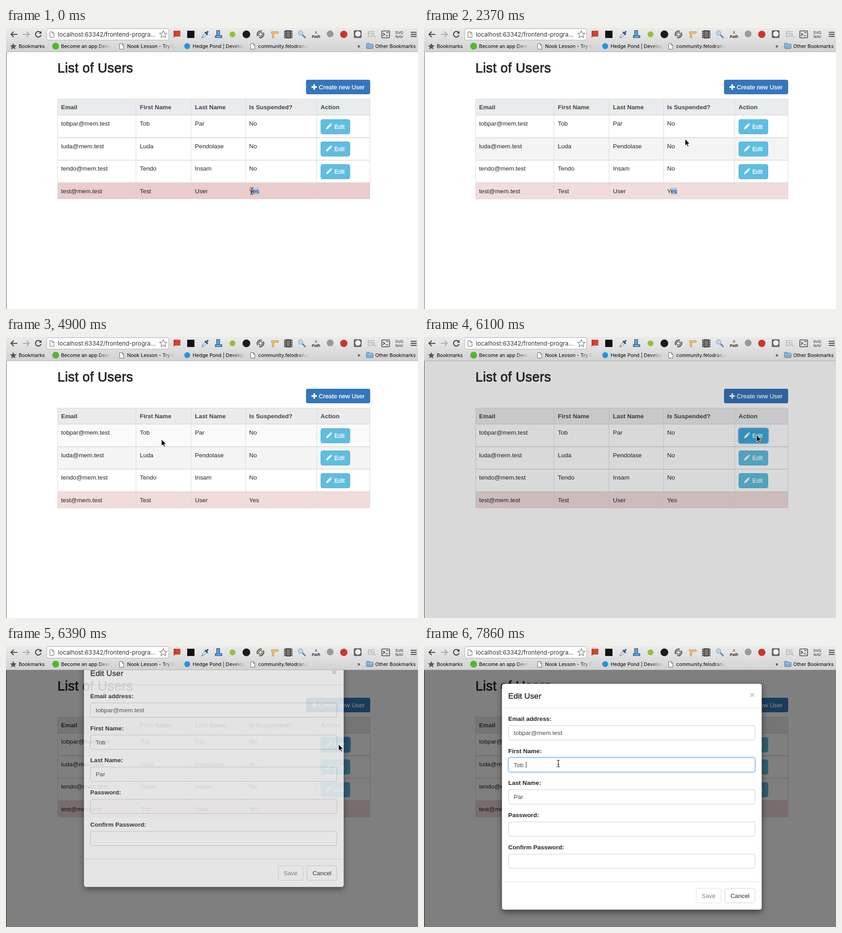
An HTML page for the animation above (8 s loop, 905 by 619 pixels).

```html
<!DOCTYPE html>
<html lang="en">
<head>
<meta charset="utf-8">
<title>List of Users</title>
<style>
html, body { margin: 0; width: 100%; height: 100%; overflow: hidden; background: #fff; }
svg { display: block; }
text { font: 13.4px "Liberation Sans", Arial, sans-serif; fill: #262626; white-space: pre; }
.bold { font-weight: bold; }
.ui { font: 10.8px Inter, sans-serif; fill: #000; }
.url { font: 13px Inter, sans-serif; fill: #333; }
.tiny { font: 8.5px "Liberation Sans", sans-serif; fill: #222; text-anchor: middle; }
.heading { font-size: 29px; letter-spacing: .38px; stroke: #262626; stroke-width: .9px; }
.title { font-size: 17.3px; letter-spacing: .2px; stroke: #262626; stroke-width: .4px; }
.white { fill: #fff; stroke: #fff; stroke-width: .3px; }
.mid { text-anchor: middle; }
.value { fill: #4a4a4a; }
.line { fill: none; stroke: #444; stroke-width: 1.6; }

.anim { animation: 8s step-end infinite; }
.row0 { fill: #fff; animation-name: row0; }
.row1 { fill: #fff; animation-name: row1; }
.row2 { fill: #fff; animation-name: row2; }
.row3 { fill: #f1dcdc; animation-name: row3; }
@keyframes row0 {
  0%, 44.4%, 64.9%, 76.2% { fill: #fff; }
  31.4%, 70.6% { fill: #f4f4f4; }
  35.1%, 61.1% { fill: #fafafa; }
}
@keyframes row1 {
  0%, 31.4%, 44.4%, 63% { fill: #fff; }
  22.2%, 35.1%, 59.3% { fill: #f4f4f4; }
  38.8% { fill: #fafafa; }
}
@keyframes row2 {
  0%, 22.2%, 40.7% { fill: #fff; }
  9.2%, 38.8% { fill: #f3f3f3; }
}
@keyframes row3 {
  0%, 40.7%, 57.4% { fill: #e9cccb; }
  9.2%, 44.4%, 59.3% { fill: #f1dcdc; }
}
.selection { animation-name: selection; }
@keyframes selection { 0% { opacity: 1; } 48.2% { opacity: 0; } }

.hot { opacity: 0; animation-name: hot; }
@keyframes hot { 0%, 91% { opacity: 0; } 72.4% { opacity: 1; } }
.ring { opacity: 0; animation-name: ring; }
@keyframes ring { 0%, 91% { opacity: 0; } 76.2% { opacity: 1; } }
.backdrop { opacity: 0; animation-name: backdrop; }
@keyframes backdrop { 0% { opacity: 0; } 76.2% { opacity: .15; } 78% { opacity: .455; } 79.8% { opacity: .5; } }
.modal { opacity: 0; animation-name: modal; }
@keyframes modal {
  0% { opacity: 0; transform: translateY(-125px); }
  79.8% { opacity: .8; transform: translateY(-50px); }
  81.7% { opacity: 1; transform: translateY(-1px); }
  83.6% { opacity: 1; transform: none; }
}
.focus { opacity: 0; animation-name: focus; }
@keyframes focus { 0% { opacity: 0; } 90.8% { opacity: .4; } 92.7% { opacity: .9; } 94.5% { opacity: 1; } }
.caret { opacity: 0; animation-name: caret; }
@keyframes caret {
  0% { opacity: 0; }
  90.8% { opacity: 1; transform: none; }
  98.2% { opacity: 1; transform: translateX(4px); }
}

.cursor { animation: move 8s step-start infinite; }
@keyframes move {
  0% { transform: translate(540px, 359px); }
  5.6% { transform: translate(540px, 359px); animation-timing-function: steps(6, start); }
  16.7% { transform: translate(552px, 311px); }
  20.3% { transform: translate(552px, 311px); animation-timing-function: steps(8, start); }
  35.1% { transform: translate(580px, 222px); animation-timing-function: steps(5, start); }
  44.4% { transform: translate(510px, 374px); animation-timing-function: steps(2, start); }
  48.2% { transform: translate(498px, 458px); }
  55.6% { transform: translate(498px, 458px); animation-timing-function: steps(4, start); }
  63% { transform: translate(341px, 225px); animation-timing-function: steps(2, start); }
  66.7% { transform: translate(640px, 181px); }
  68.7% { transform: translate(830px, 200px); }
  70.6% { transform: translate(810px, 231px); }
  72.4% { transform: translate(768px, 226px); }
  76%, 81.7% { transform: translate(730px, 216px); }
  83.5% { transform: translate(722px, 215px); animation-timing-function: steps(4, start); }
  91%, 100% { transform: translate(295px, 259px); }
}
.arrow { animation-name: arrow; }
.beam { animation-name: beam; }
@keyframes arrow { 0%, 87.2% { opacity: 0; } 7.4% { opacity: 1; } }
@keyframes beam { 0%, 87.2% { opacity: 1; } 7.4% { opacity: 0; } }
</style>
</head>
<body>
<svg width="905" height="619" viewBox="0 0 905 619">
  <defs>
    <linearGradient id="chrome" x2="0" y2="1"><stop stop-color="#ebebeb"/><stop offset="1" stop-color="#d2d2d2"/></linearGradient>
    <linearGradient id="fade"><stop offset=".75"/><stop offset="1" stop-opacity="0"/></linearGradient>
    <filter id="shadow" x="-10%" y="-10%" width="120%" height="120%"><feDropShadow dx="0" dy="5" stdDeviation="7" flood-opacity=".5"/></filter>
    <filter id="glow" x="-5%" y="-50%" width="110%" height="200%"><feDropShadow dx="0" dy="0" stdDeviation="2.5" flood-color="#66afe9" flood-opacity=".7"/></filter>
    <path id="sheet" d="M.5.5H6.5L9.5 4V12.5H.5ZM6.5.5V4H9.5" fill="#fff" stroke="#666"/>
    <path id="star" d="M0-8 2.3-2.8 8-2.3 3.7 1.6 5 7.2 0 4.2-5 7.2-3.7 1.6-8-2.3-2.3-2.8Z"/>
    <path id="pencil" d="M0 13 1.1 8.8 8.2 1.7 11.3 4.8 4.2 11.9ZM9 .9 10 0Q10.6-.4 11.2.1L12.9 1.8Q13.4 2.4 13 3L12.1 4Z" fill="#fff"/>
  </defs>

  <text class="heading" x="113" y="98">List of Users</text>
  <rect x="659" y="114" width="141" height="32" rx="4" fill="#3576bb"/>
  <path d="M671 130h12M677 124v12" stroke="#fff" stroke-width="3.4"/>
  <text class="white" x="687" y="135">Create new User</text>
  <g id="table"></g>
  <path d="M.5 53V619" stroke="#555"/>

  <rect class="anim backdrop" y="53" width="905" height="566"/>

  <g class="anim modal">
    <rect x="171" y="83" width="571" height="498" rx="5" fill="#fff" stroke="#000" stroke-opacity=".25" filter="url(#shadow)"/>
    <path d="M171 136.2H742M171 519.2H742" stroke="#e3e3e3"/>
    <text class="title" x="185" y="116">Edit User</text>
    <text class="bold mid" x="721" y="114" style="font-size:19px;fill:#c4c4c4">×</text>
    <g id="fields"></g>
    <rect class="anim focus" x="185.5" y="246" width="541.5" height="31.5" rx="4" fill="#fff" stroke="#66a5e4" filter="url(#glow)"/>
    <text class="value" x="197" y="266.5">Tob</text>
    <path class="anim caret" d="M220.5 255v14" stroke="#222"/>
    <g fill="#fff" stroke="#ccc">
      <rect x="598" y="534" width="54.5" height="32" rx="4" stroke="#dcdcdc"/>
      <rect x="661" y="534" width="66" height="32" rx="4"/>
    </g>
    <text class="mid" x="625" y="555" opacity=".6">Save</text>
    <text class="mid" x="694" y="555">Cancel</text>
  </g>

  <rect width="905" height="53" fill="url(#chrome)"/>
  <path d="M0 52.5H905" stroke="#b0b0b0"/>
  <rect x="89.5" y="1.5" width="268" height="25" rx="3.5" fill="#fff" stroke="#b0b0b0"/>
  <g class="line">
    <path d="M25 14H11M17 8 11 14 17 20" stroke-width="2.2"/>
    <path d="M37 14H51M45 8 51 14 45 20" stroke="#aaa" stroke-width="2.2"/>
    <path d="M76 10A6.2 6.2 0 1 0 77 15.5" stroke-width="2.2"/>
    <path d="M889 9.5h13M889 14h13M889 18.5h13" stroke-width="2.2"/>
  </g>
  <path d="M78 6.5V12.5H72Z" fill="#444"/>
  <use href="#sheet" x="96" y="8"/>
  <text class="url" x="114" y="19">localhost:63342/frontend-progra...</text>
  <use href="#star" x="345.5" y="14" fill="#fff" stroke="#777" stroke-width="1.2"/>

  <path d="M368 6h15v15h-15Z" fill="#d4442f"/><path d="M370 19h13v2h-13Z" fill="#eee"/><path d="M371 6v13" stroke="#98301f"/>
  <rect x="398" y="6" width="16" height="16" fill="#111"/>
  <path d="M430 22 432 17 438 11 441 14 435 20Z" fill="#dceaf5" stroke="#567"/><path d="M437 9 443 15M440 12 444 7" stroke="#34597f" stroke-width="3.5"/>
  <rect x="462.5" y="5.5" width="7" height="11" fill="#5aa2dc" stroke="#345"/><path d="M459 16h16v6h-16Z" fill="#3777b3"/><path d="M462 19h10" stroke="#fff"/>
  <circle cx="497.5" cy="14" r="6.5" fill="#97bf3a"/>
  <circle cx="528" cy="14" r="8.5" fill="#1b1b1b"/>
  <g class="line" stroke="#666"><circle cx="559" cy="14" r="4"/><path d="M553 18A7.5 7.5 0 0 1 562 7M565 10A7.5 7.5 0 0 1 556 21" stroke-width="2"/></g>
  <path d="M583 8h15v4h-10v10h-3V12h-2Z" fill="#f3c37a" stroke="#c58a35"/>
  <rect x="611" y="5" width="18" height="18" fill="#444"/><path d="M613 5v18M627 5v18" stroke="#ddd" stroke-width="2" stroke-dasharray="2 2"/><path d="M616 14h8" stroke="#777" stroke-width="14"/>
  <circle cx="647" cy="11" r="5" fill="#b8d7ef" stroke="#7995ad"/><path d="M651 15 658 22" stroke="#557fae" stroke-width="3"/>
  <text class="tiny" x="681" y="13" font-style="italic">X</text><text class="tiny" x="681" y="22" style="font-weight:bold;font-style:italic">Path</text>
  <circle cx="712" cy="13" r="7.5" fill="#999"/>
  <circle cx="742" cy="14" r="8" fill="#c8372d"/>
  <rect x="764" y="5" width="17" height="17" rx="2" fill="#666"/><circle cx="773" cy="13" r="6" fill="#f4f4f4"/>
  <g class="line" opacity=".3"><path d="M796 8h14M796 12h8M796 7v12h7"/><circle cx="806" cy="15" r="3"/><path d="M808 17 812 21"/></g>
  <g class="line"><rect x="825.5" y="6.5" width="17" height="15" rx="1"/><path d="M828 11 832 14 828 17M834 17h5M835 10h5"/></g>
  <text class="tiny" x="864" y="13">SVG</text><text class="tiny" x="864" y="22">NAV</text>

  <use href="#star" fill="#555" transform="translate(16 40.5) scale(.9)"/>
  <text class="ui" x="28" y="44">Bookmarks</text>
  <circle cx="109" cy="40" r="7.5" fill="#55b52d"/>
  <use href="#sheet" x="249" y="34"/>
  <circle cx="398" cy="40" r="6.5" fill="#2196db"/>
  <use href="#sheet" x="537" y="34"/>
  <g id="bookmarks"></g>
  <text class="ui" x="772" y="44">»</text>
  <path d="M791.5 35.5q0-2 2-2h4l2 2h5q2 0 2 2v6q0 2-2 2h-11q-2 0-2-2Z" fill="#83abd0" stroke="#5b7f9f"/><path d="M792 38h14" stroke="#b8d2e8"/>
  <text class="ui" x="811" y="44">Other Bookmarks</text>

  <g class="cursor">
    <path class="anim arrow" d="M.5.5V15L3.9 11.8 6.2 17.1 8.5 16.1 6.2 10.9H10.8Z" stroke="#fff" stroke-width=".9"/>
    <path class="anim beam" d="M-3.5-7.5Q0-7.5 0-5Q0-7.5 3.5-7.5M0-5V5M-3.5 7.5Q0 7.5 0 5Q0 7.5 3.5 7.5M-2 1.5H2" fill="none" stroke="#222" stroke-width="1.2"/>
  </g>
</svg>
<script>
const fill = (id, parts) => document.getElementById(id).innerHTML = parts.join('');
const text = (x, y, s, cls = '') => `<text x="${x}" y="${y}" class="${cls}">${s}</text>`;
const box = (x, y, w, h, attrs) => `<rect x="${x}" y="${y}" width="${w}" height="${h}" ${attrs}/>`;

const tops = [192, 241.6, 291.2, 340.8, 377];
const columns = [121, 294, 415, 534, 691];
const users = [
  ['tobpar@mem.test', 'Tob', 'Par', 'No'],
  ['luda@mem.test', 'Luda', 'Pendolase', 'No'],
  ['tendo@mem.test', 'Tendo', 'Insam', 'No'],
  ['test@mem.test', 'Test', 'User', 'Yes'],
];

const editButton = (y, first) => {
  const shape = attrs => box(691.5, y + .5, 64, 32, `rx="4" ${attrs}`);
  return shape('fill="#5fbde0" stroke="#55b5db"')
    + (first ? shape('class="anim hot" fill="#37abd5" stroke="#2b9ac4"')
      + shape('class="anim ring" fill="none" stroke="#5a9be8" stroke-width="2.5" filter="url(#glow)"') : '')
    + `<use href="#pencil" x="703" y="${y + 9}"/>` + text(721, y + 21, 'Edit', 'white');
};

const rowBacks = users.map((_, i) =>
  box(113, tops[i], 686.5, tops[i + 1] - tops[i], `class="anim row${i}"`));
const cells = users.map((user, i) =>
  user.map((s, c) => text(columns[c], Math.round(tops[i] + 23), s)).join('')
  + (i < 3 ? editButton(Math.round(tops[i] + 8.6), i === 0) : ''));
const headers = ['Email', 'First Name', 'Last Name', 'Is Suspended?', 'Action'];

fill('table', [
  box(113, 156, 686.5, 36, 'fill="#e9ebed"'),
  ...rowBacks,
  box(542, 352, 14, 15, 'class="anim selection" fill="#a9c8f2"'),
  '<path d="M113.5 156V377M285.5 156V377M406.5 156V377M526.5 156V377M682.5 156V377M799.5 156V377M113 156.5H800M113 376.5H800" stroke="#d9d9db"/>',
  '<path d="M113 191.7H800M113 241.6H800M113 291.2H800M113 340.8H800" stroke="#d9d9db" stroke-width="1.6"/>',
  ...headers.map((s, c) => `<g opacity=".85">${text(columns[c], 179, s, 'bold')}</g>`),
  ...cells,
]);

const fields = [['Email address:', 'tobpar@mem.test'], ['First Name:', ''], ['Last Name:', 'Par'],
  ['Password:', ''], ['Confirm Password:', '']];
fill('fields', fields.map(([label, value], i) => {
  const y = 175.4 + i * 70.7;
  return text(185, y - 10.4, label, 'bold')
    + box(185.5, y, 541.5, 31.5, 'rx="4" fill="#fff" stroke="#ccc"')
    + text(197, y + 20.4, value, 'value');
}));

const bookmarks = [[121, 'Become an app Deve'], [266, 'Nook Lesson - Try O'],
  [410, 'Hedge Pond | Develop'], [554, 'community.felodran.c']];
fill('bookmarks', bookmarks.map(([x, s]) =>
  `<text class="ui" x="${x}" y="44" style="fill:url(#fade)">${s}</text>`));
</script>
</body>
</html>
```
